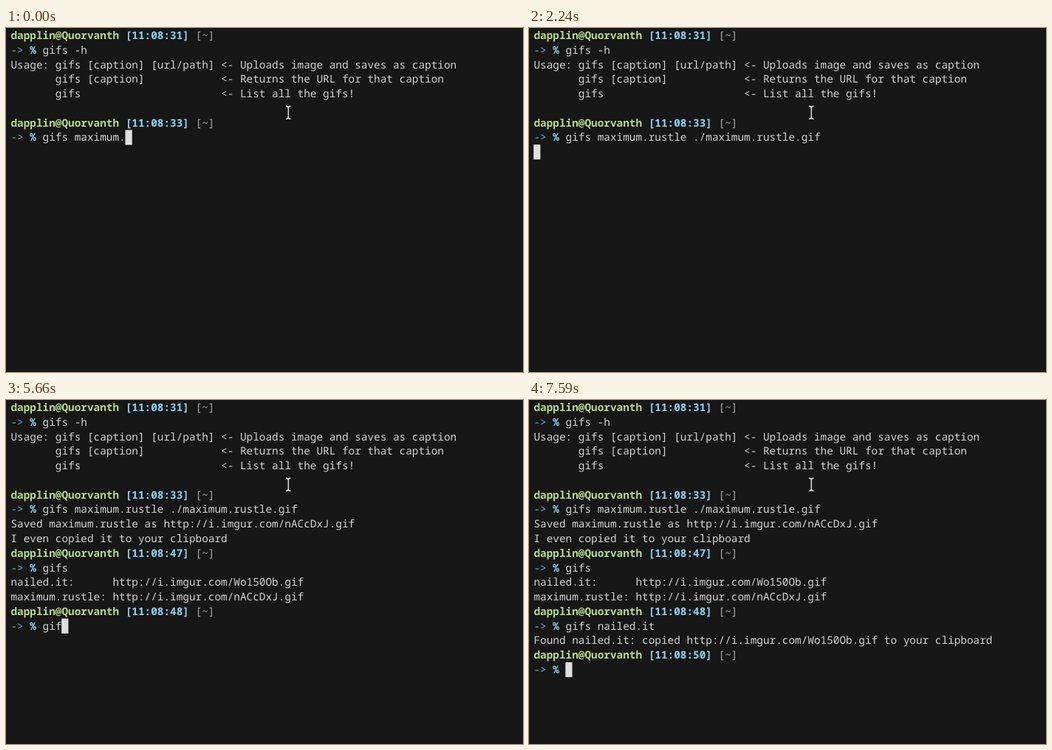
These frames come from a looping animation (700x467 px, 8000 ms). An HTML page:

```html
<!DOCTYPE html>
<html lang="en">
<head>
<meta charset="utf-8">
<title>Terminal session</title>
<style>
  html, body { margin: 0; width: 100%; height: 100%; overflow: hidden; background: #171717; }
  svg { display: block; width: 700px; height: 467px; }
  text {
    font: 14.38px "Noto Sans Mono", "DejaVu Sans Mono", monospace;
    white-space: pre;
    text-rendering: geometricPrecision;
    fill: #d4d4d4;
  }
  .user { fill: #b6da8b; font-weight: 700; }
  .time { fill: #8bd3f1; font-weight: 700; }
  .path { fill: #a8a8a8; }
  .arrow { fill: #6db3ce; }
</style>
</head>
<body>
<svg viewBox="0 0 700 467">
  <rect width="700" height="467" fill="#171717"/>
  <g id="screen"></g>
  <rect id="cursor" width="9.2" height="20.2" fill="#e0e0e0"/>
  <path d="M379 106 Q382.3 106 382.3 109 Q382.3 106 385.6 106 M382.3 109 V121 M379 123.5 Q382.3 123.5 382.3 121 Q382.3 123.5 385.6 123.5" fill="none" stroke="#dcdcdc" stroke-width="1.5"/>
</svg>
<script>
const LOOP = 8000;
const LEFT = 6.4, COLUMN = 8.628, ROW = 19.78, BASELINE = 15;
const screen = document.getElementById("screen");
const cursor = document.getElementById("cursor");

const plain = text => [["", text]];
const prompt = time => [["user", "dapplin@Quorvanth"], ["time", ` [${time}]`], ["path", " [~]"]];
const command = text => [["arrow", "->"], ["time", " %"], ["", " " + text]];

// Part of the text typed so far, in equal steps from first to last.
function typed(t, text, first, last = first, steps = 1) {
  if (t < first) return "";
  const gap = steps > 1 ? (last - first) / (steps - 1) : 1;
  const step = Math.min(steps, Math.floor((t - first) / gap + 0.04) + 1);
  return text.slice(0, Math.round(text.length * step / steps));
}

function linesAt(t) {
  const lines = [
    prompt("11:08:31"),
    command("gifs -h"),
    plain("Usage: gifs [caption] [url/path] <- Uploads image and saves as caption"),
    plain("       gifs [caption]            <- Returns the URL for that caption"),
    plain("       gifs                      <- List all the gifs!"),
    plain(""),
    prompt("11:08:33"),
    command("gifs maximum." +
      typed(t, "rustle ", 300, 750, 4) +
      typed(t, "./", 1050) +
      typed(t, "max", 1350, 1500, 2) +
      typed(t, "imum.rustle.gif ", 1800))
  ];
  if (t >= 4040) lines.push(
    plain("Saved maximum.rustle as http://i.imgur.com/nACcDxJ.gif"),
    plain("I even copied it to your clipboard"),
    prompt("11:08:47"),
    command(typed(t, "gifs", 4480, 4780, 3))
  );
  if (t >= 5220) lines.push(
    plain("nailed.it:      http://i.imgur.com/Wo150Ob.gif"),
    plain("maximum.rustle: http://i.imgur.com/nACcDxJ.gif"),
    prompt("11:08:48"),
    command(typed(t, "gifs", 5520, 5810, 3) +
      typed(t, " nailed.", 6260, 6840, 5) +
      typed(t, "it", 7140))
  );
  if (t >= 7590) lines.push(
    plain("Found nailed.it: copied http://i.imgur.com/Wo150Ob.gif to your clipboard"),
    prompt("11:08:50"),
    command("")
  );
  // While a command runs, the cursor waits on an empty line.
  const running = [[2240, 4040], [5080, 5220], [7440, 7590]];
  if (running.some(([from, to]) => t >= from && t < to)) lines.push(plain(""));
  return lines;
}

const lineLength = line => line.reduce((sum, [, text]) => sum + text.length, 0);

function lineMarkup(line, row) {
  let column = 0;
  const spans = line.map(([style, text]) => {
    const x = LEFT + column * COLUMN;
    column += text.length;
    const safe = text.replace(/</g, "&lt;").replace(/>/g, "&gt;");
    return `<tspan x="${x}" class="${style}">${safe}</tspan>`;
  });
  return `<text y="${row * ROW + BASELINE}">${spans.join("")}</text>`;
}

let shown = "";
function render(t) {
  const lines = linesAt(t);
  const markup = lines.map(lineMarkup).join("");
  if (markup === shown) return;
  shown = markup;
  screen.innerHTML = markup;
  const row = lines.length - 1;
  cursor.setAttribute("x", LEFT - 0.2 + lineLength(lines[row]) * COLUMN);
  cursor.setAttribute("y", row * ROW);
}

const start = performance.now();
function frame(now) {
  render(Math.max(0, now - start) % LOOP);
  requestAnimationFrame(frame);
}
render(0);
requestAnimationFrame(frame);
</script>
</body>
</html>
```
